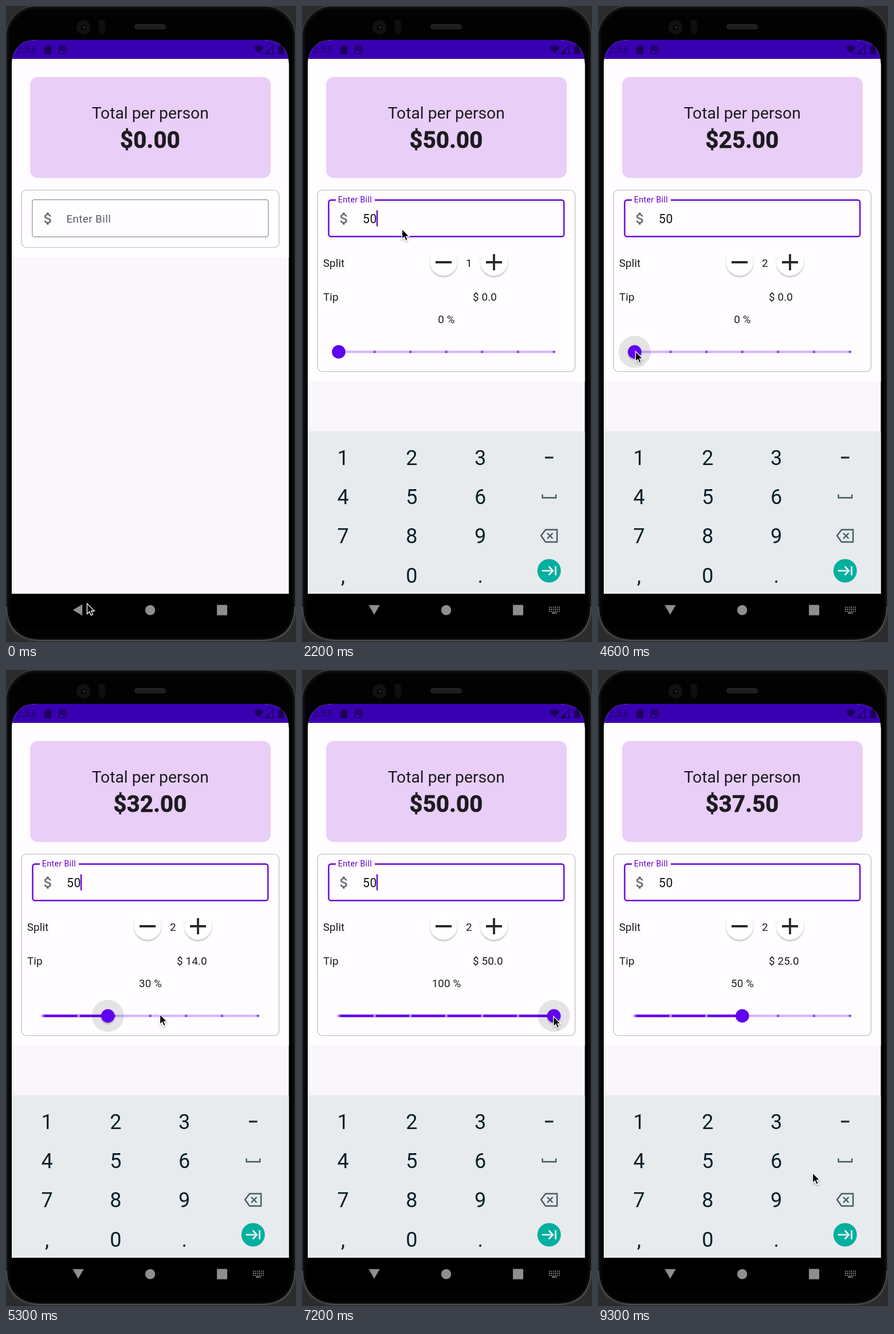
These frames come from a looping animation (506 by 1107 pixels, 9.4 s). An HTML page:

```html
<!DOCTYPE html>
<html lang="en">
<head>
<meta charset="utf-8">
<title>Tip calculator</title>
<style>
  html, body { margin: 0; height: 100%; overflow: hidden; background: #2b2b2e; }
  svg { display: block; width: 100vw; height: 100vh; font-family: Roboto, sans-serif; }
  .body { font-size: 18.83px; letter-spacing: .1px; fill: #1c1b1f; }
  .mid { text-anchor: middle; }
  .key { font-size: 36px; fill: #0b1f29; text-anchor: middle; }
  .line { fill: none; stroke: #455a64; stroke-width: 2.4; }
</style>
</head>
<body>
<svg viewBox="0 0 506 1107">
  <defs>
    <clipPath id="screenClip"><path d="M10 1080V103Q11 59 55 59H449Q492.500 59 493.500 103V1080Z"/></clipPath>
    <filter id="shadow" x="-30%" y="-30%" width="160%" height="170%">
      <feDropShadow dx="0" dy="2" stdDeviation="1.8" flood-opacity=".3"/>
    </filter>
    <filter id="soft" x="-5%" y="-5%" width="110%" height="110%">
      <feDropShadow dx="0" dy="-1" stdDeviation="1.5" flood-opacity=".12"/>
    </filter>
  </defs>

  <!-- phone -->
  <rect width="506" height="1107" fill="#2b2b2e"/>
  <rect x="0" y="0" width="505" height="1105" rx="52" fill="#161618" stroke="#404043" stroke-width="1.500"/>
  <rect x="4" y="4" width="497" height="1097" rx="50" fill="#020202" stroke="#0b0b0c" stroke-width="3"/>
  <path d="M1 1046Q3 1102 58 1104H448Q502 1102 504 1046" fill="none" stroke="#58585a" stroke-width="1.500"/>
  <circle cx="135" cy="37" r="12.500" fill="#111113"/>
  <circle cx="135" cy="37" r="6.500" fill="#08080b" stroke="#17171b" stroke-width="2"/>
  <circle cx="136" cy="37" r="1.800" fill="#34364a"/>
  <rect x="161" y="23" width="12" height="27" rx="6" fill="#0c0c0e"/>
  <circle cx="167" cy="30" r="3.500" fill="none" stroke="#161618"/>
  <circle cx="167" cy="42" r="3.500" fill="none" stroke="#161618"/>
  <rect x="224.500" y="32" width="54" height="8" rx="4" fill="#1d1d1f" stroke="#29292b"/>

  <g clip-path="url(#screenClip)">
    <rect x="10" y="59" width="484" height="965" fill="#f9f7fb"/>
    <rect id="sheet" x="10" y="92" width="484" fill="#fffdff"/>

    <!-- status bar -->
    <rect x="10" y="59" width="484" height="33" fill="#3900b1"/>
    <g fill="#1b0058">
      <text x="18.500" y="82" font-size="17" letter-spacing=".3">2:55</text>
      <path d="M71 69H79V84H67V73Z"/>
      <circle cx="98.500" cy="76" r="7.200" fill="none" stroke="#1b0058" stroke-width="1.700"/>
      <path d="M94 72L103 81M95 77Q94 72 99 72Q103 73 102 77" fill="none" stroke="#1b0058" stroke-width="2.400"/>
      <path d="M432 72Q441 65 450 72L441 83Z"/>
      <path d="M466 69V83H452Z" fill="none" stroke="#1b0058" stroke-width="1.700"/>
      <path d="M459 76V83H452Z"/>
      <path d="M475 70H478V68H482V70H485V84H475Z"/>
    </g>

    <!-- total -->
    <rect x="42" y="123.500" width="420" height="176" rx="14" fill="#e9cef7"/>
    <g fill="#1c1b1f" class="mid">
      <text x="251.700" y="196" font-size="28.240">Total per person</text>
      <text id="total" x="251.500" y="246.500" font-size="40" font-weight="700" letter-spacing=".3" stroke="#1c1b1f" stroke-width=".7"></text>
    </g>

    <!-- bill field -->
    <rect id="card" x="27" y="320.500" width="449.500" rx="9" fill="none" stroke="#bdbbc0" stroke-width="1.200"/>
    <rect id="field" rx="4" fill="none"/>
    <rect id="notch" x="59" y="334" width="68" height="7" fill="#fffdff"/>
    <path transform="translate(59.300 355.900) scale(1.177)" fill="#66636a" d="M11.800 10.900c-2.270-.59-3-1.200-3-2.150 0-1.090 1.010-1.850 2.700-1.850 1.780 0 2.440.85 2.500 2.100h2.210c-.07-1.720-1.120-3.300-3.210-3.810V3h-3v2.160c-1.940.42-3.500 1.680-3.500 3.610 0 2.310 1.910 3.460 4.700 4.130 2.500.6 3 1.480 3 2.410 0 .69-.49 1.790-2.700 1.790-2.060 0-2.870-.92-2.980-2.100h-2.200c.12 2.190 1.760 3.420 3.680 3.830V21h3v-2.150c1.950-.37 3.500-1.500 3.500-3.550 0-2.840-2.430-3.810-4.700-4.400z"/>
    <text id="label">Enter Bill</text>
    <text id="bill" x="106" y="377.800" font-size="21.200" letter-spacing=".5" fill="#111"></text>
    <rect id="caret" y="355.500" width="2.300" height="28" fill="#6200d8"/>

    <!-- split, tip and slider -->
    <g id="details" class="body">
      <text x="36.800" y="453.700">Split</text>
      <g filter="url(#shadow)" fill="#fff">
        <circle cx="247" cy="446" r="23.500"/><circle cx="335" cy="446" r="23.500"/>
      </g>
      <g id="press">
        <rect x="311.500" y="422.500" width="47" height="47" fill="#dedede"/>
        <circle cx="335" cy="446" r="23.500" fill="#e8e8e8"/>
      </g>
      <path d="M233 446H261M321 446H349M335 432V460" stroke="#29272c" stroke-width="3.800"/>
      <text id="split" class="mid" x="291.300" y="453.700"></text>
      <text x="37" y="512.500">Tip</text>
      <text id="tip" x="298" y="512.500"></text>
      <text id="percent" class="mid" x="252" y="552"></text>
      <g stroke-width="4.700" stroke-linecap="round">
        <path d="M64 602H440" stroke="#d7b9fb"/>
        <path id="active" stroke="#6000ee"/>
      </g>
      <g id="ticks"></g>
      <circle id="halo" cy="602" r="28" fill="#000" opacity=".1"/>
      <circle id="thumb" cy="602" r="11.800" fill="#6000f2"/>
    </g>
  </g>

  <!-- navigation bar -->
  <rect x="10" y="1023" width="483.500" height="57" fill="#000"/>
  <g id="keyboard">
    <rect x="10" y="742.500" width="483.500" height="280.500" fill="#e7ebed" filter="url(#soft)"/>
    <g id="keys"></g>
    <path class="line" d="M424 786H438.500" style="stroke:#0b1f29;stroke-width:3"/>
    <path class="line" d="M419.500 850V856H443V850"/>
    <path class="line" d="M417 922L425 911.500H445V933H425ZM428 917.500L437.500 927M437.500 917.500L428 927"/>
    <circle cx="431.200" cy="983" r="20.500" fill="#00b0a0"/>
    <path d="M418.500 983H437M430.500 975.500L438 983L430.500 990.500M442.500 975V991" fill="none" stroke="#fff" stroke-width="2.500"/>
  </g>
  <g fill="#8e8e8e">
    <path id="back" d="M-9.500 0L7.200 -9.700V9.700Z"/>
    <circle cx="251.600" cy="1051.500" r="8.700"/>
    <rect x="368" y="1042.500" width="18" height="18" rx="1"/>
    <g id="imeSwitch" stroke="#8e8e8e" stroke-width="1.800" fill="none">
      <path d="M431 1046.500H450M431 1050H450" stroke-dasharray="1.800 1.600"/>
      <path d="M431 1053.500H450" stroke-dasharray="1.800 1.600"/>
      <path d="M436 1056.500H445"/>
    </g>
  </g>

  <path id="pointer" d="M.5 1V19L4.600 15.200L7.300 21.400L10.300 20.100L7.700 14H13.200Z" fill="#000" stroke="#fff" stroke-width="1.300" filter="url(#shadow)"/>
</svg>

<script>
const LOOP = 9400, STEP = 100;
const FOCUS = 860, FIRST_DIGIT = 1600, SECOND_DIGIT = 2100, SPLIT_TAP = 3400;
const DRAG_START = 4500, DRAG_END = 8700;
const TRACK_LEFT = 64, TRACK_WIDTH = 375.5;

// [time, value...] with linear motion between entries
const percentKeys = [[4600, 0], [5200, 28.2], [5300, 30.3], [6100, 88.4], [6200, 88.4], [6500, 100],
  [7300, 100], [7800, 80.2], [7900, 77.3], [8500, 50]];
const pointerKeys = [[100, 141, 1039], [700, 174, 387], [2300, 174, 387], [3000, 330, 468],
  [3800, 330, 468], [4400, 65, 600], [4600, 65, 600], [5300, 268, 598], [6200, 414, 598],
  [6500, 440, 600], [7300, 438, 602], [7900, 349, 604], [8500, 252, 604],
  [8800, 252, 604], [9300, 374, 874]];

const el = id => document.getElementById(id);
const set = (id, attrs) => {
  for (const name in attrs) el(id).setAttribute(name, attrs[name]);
};
const show = (id, visible) => { el(id).style.display = visible ? '' : 'none'; };
const clamp = v => Math.max(0, Math.min(1, v));
const mix = (a, b, p) => a + (b - a) * p;

function sample(keys, t) {
  const next = keys.findIndex(key => key[0] > t);
  if (next === 0) return keys[0].slice(1);
  if (next < 0) return keys[keys.length - 1].slice(1);
  const from = keys[next - 1], to = keys[next];
  const p = (t - from[0]) / (to[0] - from[0]);
  return from.slice(1).map((v, i) => mix(v, to[i + 1], p));
}

const sliderAt = t => sample(percentKeys, t)[0];
const percentAt = t => Math.floor(sliderAt(t));

['123', '456', '789', ',0.'].forEach((row, r) => [...row].forEach((char, c) => {
  el('keys').innerHTML += `<text class="key" x="${71.6 + c * 119.8}" y="${799 + r * 68.2}">${char}</text>`;
}));
for (let i = 0; i < 7; i++) {
  el('ticks').innerHTML += `<circle cx="${TRACK_LEFT + i * TRACK_WIDTH / 6}" cy="602" r="2.3"/>`;
}

// The border grows inwards when focused
function drawBorder(focused) {
  const line = focused ? 2.4 : 1.2;
  set('field', {
    x: 45.3 + line / 2, y: 336.5 + line / 2, width: 413 - line, height: 66 - line,
    stroke: focused ? '#6a00da' : '#8b898e', 'stroke-width': line
  });
}

function drawField(t) {
  const focused = t >= FOCUS, lift = clamp((t - FOCUS) / 140);
  const text = t >= SECOND_DIGIT ? '50' : t >= FIRST_DIGIT ? '5' : '';
  const lastInput = t >= SECOND_DIGIT ? SECOND_DIGIT : t >= FIRST_DIGIT ? FIRST_DIGIT : FOCUS;
  drawBorder(focused);
  set('label', {
    x: mix(105.4, 62.8, lift), y: mix(377, 342, lift), 'font-size': mix(18.83, 14.12, lift),
    'letter-spacing': .4, fill: focused ? '#6200c8' : '#5f5c63'
  });
  show('notch', focused);
  el('bill').textContent = text;
  set('caret', { x: 106.7 + text.length * 11.6 });
  show('caret', focused && (t - lastInput) % 950 < 475);
  return Number(text);
}

function drawDetails(t, bill) {
  const open = bill > 0, dragging = t >= DRAG_START && t < DRAG_END;
  const split = t >= SPLIT_TAP ? 2 : 1;
  const position = sliderAt(t);
  const tip = bill * percentAt(t - STEP) / 100; // trails the slider by one update
  const x = TRACK_LEFT + TRACK_WIDTH * position / 100;
  set('sheet', { height: open ? 562 : 345.5 });
  set('card', { height: open ? 316 : 100 });
  show('details', open);
  el('total').textContent = '$' + ((bill + tip) / split).toFixed(2);
  el('split').textContent = split;
  el('tip').textContent = '$ ' + tip.toFixed(1);
  el('percent').textContent = percentAt(t) + ' %';
  show('press', t >= SPLIT_TAP && t < SPLIT_TAP + 500);
  set('active', { d: `M${TRACK_LEFT} 602H${x}` });
  [...el('ticks').children].forEach((tick, i) =>
    tick.setAttribute('fill', i * 100 / 6 <= position ? '#c49cf5' : '#9047e4'));
  set('halo', { cx: x });
  show('halo', dragging);
  set('thumb', { cx: x, filter: dragging ? 'url(#shadow)' : 'none' });
}

function drawKeyboard(t) {
  const p = clamp((t - FOCUS) / 200), eased = 1 - (1 - p) ** 2;
  set('keyboard', { transform: `translate(0 ${30 * (1 - eased)})`, opacity: clamp(eased * 1.08) });
  set('back', { transform: `translate(126 ${mix(1051.3, 1050, p)}) rotate(${-90 * p})` });
  show('imeSwitch', p > 0);
}

function frame() {
  const t = Math.floor(performance.now() % LOOP / STEP) * STEP;
  drawDetails(t, drawField(t));
  drawKeyboard(t);
  set('pointer', { transform: `translate(${sample(pointerKeys, t).join(' ')})` });
  requestAnimationFrame(frame);
}
frame();
</script>
</body>
</html>
```
